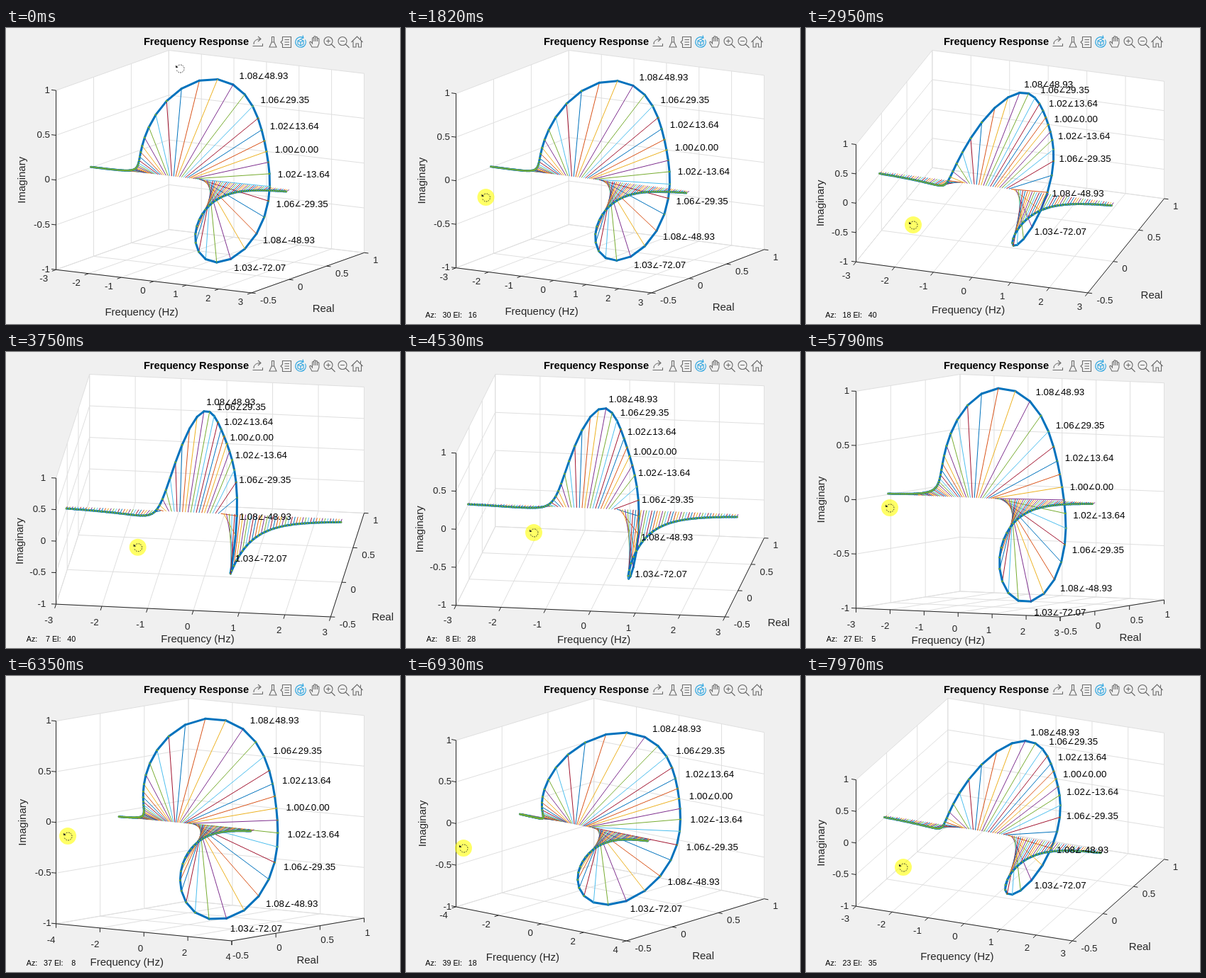
An HTML page with a canvas for the animation above (8 s loop, 555x418 px).

```html
<!DOCTYPE html>
<html lang="en">
<head>
<meta charset="utf-8">
<title>Frequency Response</title>
<style>
html, body { margin: 0; width: 100%; height: 100%; overflow: hidden; background: #f0f0f0; }
canvas { display: block; }
</style>
</head>
<body>
<canvas id="stage" width="555" height="418"></canvas>
<script>
const ctx = document.getElementById('stage').getContext('2d');
const LOOP = 8000, DRAG_START = 1820, STEP = 113.7, LAST_STEP = 54;
const LEFT = 70.5, RIGHT = 504.5, TOP = 31.5, BOTTOM = 374;
const INK = '#262626', GRID = '#dfdfdf';
const SANS = '"Liberation Sans", Arial, sans-serif';
const COLORS = ['#0072bd', '#d95319', '#edb120', '#7e2f8e', '#77ac30', '#4dbeee', '#a2142f'];

// Drag path: step, azimuth, elevation, pointer x, pointer y
const DRAG = [
  [0, 30, 16, 112.5, 239], [5, 25, 29, 128, 261], [10, 18.2, 40.2, 151, 278],
  [15, 10, 41, 176, 279], [20, 4, 36, 195, 268], [24, 8.3, 27.6, 180, 255],
  [31, 18, 9, 146, 226], [35, 27, 5, 118, 220], [40, 37, 8, 87, 226],
  [45, 39, 18, 81, 243], [50, 32, 29, 107, 262], [54, 23, 35, 137, 270]
];
// Pointer before the drag: time, x, y
const APPROACH = [
  [0, 245, 57], [120, 232, 76], [230, 199, 128], [340, 160, 186], [460, 130, 232],
  [580, 120, 249], [800, 115, 242], [920, 110, 236], [1260, 109, 236]
];

// H(s) = 13 / (s^2 + 4s + 13) on the imaginary axis
function response(f) {
  const w = 2 * Math.PI * f, a = 13 - w * w, b = 4 * w, d = a * a + b * b;
  return { f, re: 13 * a / d, im: -13 * b / d };
}
const SAMPLES = Array.from({ length: 101 }, (_, i) => response((i - 50) * 0.06));
const TAGS = [44, 46, 48, 50, 52, 54, 56, 58].map(i => {
  const s = SAMPLES[i];
  const deg = Math.atan2(s.im, s.re) * 180 / Math.PI;
  return { s, mag: Math.hypot(s.re, s.im).toFixed(2), deg: (i === 50 ? 0 : deg).toFixed(2) };
});

// Cubic Hermite through uneven keys
function spline(keys, k) {
  let i = 0;
  while (i < keys.length - 2 && k >= keys[i + 1][0]) i++;
  const a = keys[i], b = keys[i + 1], h = b[0] - a[0], u = (k - a[0]) / h;
  const slope = (n, c) => {
    const p = keys[Math.max(n - 1, 0)], q = keys[Math.min(n + 1, keys.length - 1)];
    return (q[c] - p[c]) / (q[0] - p[0]);
  };
  return a.map((_, c) =>
    (2 * u ** 3 - 3 * u * u + 1) * a[c] + (u ** 3 - 2 * u * u + u) * h * slope(i, c) +
    (3 * u * u - 2 * u ** 3) * b[c] + (u ** 3 - u * u) * h * slope(i + 1, c));
}

function makeView(azDeg, elDeg) {
  const az = azDeg * Math.PI / 180, el = elDeg * Math.PI / 180;
  const ca = Math.cos(az), sa = Math.sin(az), ce = Math.cos(el), se = Math.sin(el);
  const w = (RIGHT - LEFT) / (ca + sa);
  const h = (BOTTOM - TOP) / (ce + se * (ca + sa));
  const limit = azDeg > 34 ? 4 : 3;
  // Unit cube to stage
  const cube = (x, y, z) => ({
    x: LEFT + w * (x * ca + y * sa),
    y: BOTTOM - h * ((1 - x) * sa * se + y * ca * se + z * ce),
    d: x * sa * ce - y * ca * ce + z * se
  });
  return {
    az: azDeg, limit, cube, flat: elDeg < 10,
    tiltX: h * se * sa, tiltY: h * se * ca,
    data: (f, re, im) => cube((f / limit + 1) / 2, (re + 0.5) / 1.5, (im + 1) / 2)
  };
}

function line(points, color, width = 1) {
  ctx.strokeStyle = color;
  ctx.lineWidth = width;
  ctx.beginPath();
  points.forEach(p => ctx.lineTo(p.x, p.y));
  ctx.stroke();
}

function dot(x, y, r, color) {
  ctx.fillStyle = color;
  ctx.beginPath();
  ctx.arc(x, y, r, 0, 2 * Math.PI);
  ctx.fill();
}

function text(str, x, y, size, align = 'center', color = INK, font = SANS) {
  ctx.font = size + 'px ' + font;
  ctx.textAlign = align;
  ctx.textBaseline = 'middle';
  ctx.fillStyle = color;
  ctx.fillText(str, x, y);
}

function direction(a, b) {
  const n = Math.hypot(b.x - a.x, b.y - a.y);
  return { x: (b.x - a.x) / n, y: (b.y - a.y) / n };
}

function middle(a, b) {
  return { x: (a.x + b.x) / 2, y: (a.y + b.y) / 2 };
}

function drawAxes(v) {
  const c = v.cube;
  const wall = corners => {
    ctx.fillStyle = '#fff';
    ctx.beginPath();
    corners.map(p => c(...p)).forEach(p => ctx.lineTo(p.x, p.y));
    ctx.fill();
  };
  wall([[0, 0, 0], [1, 0, 0], [1, 1, 0], [0, 1, 0]]);
  wall([[0, 0, 0], [0, 1, 0], [0, 1, 1], [0, 0, 1]]);
  wall([[0, 1, 0], [1, 1, 0], [1, 1, 1], [0, 1, 1]]);

  const ticks = (from, gap, count) => Array.from({ length: count + 1 }, (_, i) =>
    ({ p: i / count, s: String(from + i * gap) }));
  const gap = v.limit === 4 ? 2 : 1;
  const xs = ticks(-v.limit, gap, 2 * v.limit / gap);
  const ys = ticks(-0.5, 0.5, 3);
  const zs = ticks(-1, 0.5, 4);
  xs.forEach(({ p }) => line([c(p, 0, 0), c(p, 1, 0), c(p, 1, 1)], GRID));
  ys.forEach(({ p }) => line([c(1, p, 0), c(0, p, 0), c(0, p, 1)], GRID));
  zs.forEach(({ p }) => line([c(0, 0, p), c(0, 1, p), c(1, 1, p)], GRID));

  const a = c(0, 0, 0), b = c(1, 0, 0), back = c(1, 1, 0), up = c(0, 0, 1);
  line([up, a, b, back], INK);

  // Seen almost edge-on, the floor ticks hang down
  const down = { x: 0, y: 1 };
  const xDir = direction(a, b);
  const outX = v.flat ? down : direction(back, b);
  const outY = v.flat ? down : xDir;
  const mark = (p, d, len = 6) => line([p, { x: p.x + len * d.x, y: p.y + len * d.y }], INK);
  xs.forEach(({ p, s }) => {
    const q = c(p, 0, 0);
    mark(q, outX);
    text(s, q.x - 1 + 11 * outX.x, q.y + 8.5 + 15 * outX.y, 13.33, 'right');
  });
  ys.forEach(({ p, s }) => {
    const q = c(1, p, 0);
    mark(q, outY);
    text(s, q.x + 1 + 11.5 * outY.x, q.y + 11 + 10 * outY.y * v.flat, 13.33, 'left');
  });
  zs.forEach(({ p, s }) => {
    const q = c(0, 0, p);
    mark(q, xDir, -6.5);
    text(s, 54.5 + 0.25 * v.az, q.y, 13.33, 'right');
  });

  const mx = middle(a, b), my = middle(b, back), mz = middle(a, up);
  text('Frequency (Hz)', mx.x + 13 - v.az, mx.y + 37.5 + 0.21 * v.tiltX, 15);
  text('Real', my.x + 58 - 1.2 * v.az, my.y + 36 + 0.26 * v.tiltY, 15);
  ctx.save();
  ctx.translate(19 + 0.12 * v.az, mz.y);
  ctx.rotate(-Math.PI / 2);
  text('Imaginary', 0, 0, 15);
  ctx.restore();
}

function drawData(v) {
  const tips = SAMPLES.map(s => v.data(s.f, s.re, s.im));
  const items = [];
  tips.forEach((tip, i) => {
    const foot = v.data(SAMPLES[i].f, 0, 0);
    items.push({
      d: (tip.d + foot.d) / 2,
      draw: () => line([foot, tip], COLORS[(i + 1) % 7])
    });
    if (i) {
      const prev = tips[i - 1];
      items.push({ d: (tip.d + prev.d) / 2, draw: () => line([prev, tip], COLORS[0], 3) });
    }
    items.push({ d: tip.d + 0.04, draw: () => dot(tip.x, tip.y, 1.3, COLORS[4]) });
  });
  ctx.lineCap = 'round';
  items.sort((p, q) => p.d - q.d).forEach(item => item.draw());
  ctx.lineCap = 'butt';

  TAGS.forEach(({ s, mag, deg }) => {
    const p = v.data(s.f, 1.1 * s.re, 1.1 * s.im), x = p.x + 1.2, y = p.y + 1.7;
    text(mag, x, y, 13.33, 'left', '#000');
    const end = x + ctx.measureText(mag).width;
    text('∠', end, y + 0.5, 10.5, 'left', '#000', '"DejaVu Sans", sans-serif');
    text(deg, end + 9.5, y, 13.33, 'left', '#000');
  });
}

const GRAY = '#6b6b6b', BLUE = '#2ca5e0';
const LENS = x => `M${x} 18.5a6 6 0 1 0 12 0a6 6 0 1 0-12 0m10.5 4.500l5 5m-12.500-9.500h6`;
const ICONS = [
  // share, brush, data tip
  ['M347.5 25.5h14v-3.500M349 23c0-5 4-7.500 9-7.500M355 12l4 3.500-4 3.500', GRAY],
  ['M374.5 12.500h3v7l3.500 7.500h-10l3.500-7.500zM373.500 20h5', GRAY],
  ['M389.5 12.500h12v15h-12v-5l-2.500-2.500 2.500-2.500zM392.500 16.500h6.500M392.500 20h6.500M392.500 23.500h6.500', GRAY],
  // rotate, hand
  ['M418.500 13.500a7.300 7.300 0 1 0 3 3M418 10.500l1 3.500-3.500 1M415 16l4 2v5l-4 2-4-2v-5zM411 18l4 2 4-2M415 20v5', BLUE],
  ['M431 27l-3-5.500c-1-2 1-3 2.200-1.200l1.300 1.700v-7c0-2 2.300-2 2.300 0v4v-6c0-2 2.400-2 2.400 0v6v-5c0-2 2.400-2 2.400 0v5v-3c0-2 2.300-2 2.300 0v6l-2 5z', GRAY],
  // zoom in, zoom out, home
  [LENS(448) + 'm-3-3v6', GRAY],
  [LENS(468), GRAY],
  ['M486.500 20l8-8 8 8M489 18.500v8.500h4v-5h3.500v5h4v-8.500M499.500 16v-3.500', GRAY]
].map(([d, color]) => ({ path: new Path2D(d), color }));

function drawHeader() {
  ctx.font = 'bold 14.67px ' + SANS;
  ctx.textAlign = 'center';
  ctx.textBaseline = 'alphabetic';
  ctx.fillStyle = '#000';
  ctx.fillText('Frequency Response', 268, 24);
  ctx.lineWidth = 1.1;
  ICONS.forEach(({ path, color }) => {
    ctx.strokeStyle = color;
    ctx.stroke(path);
  });
}

function drawPointer(x, y, pressed) {
  if (pressed) dot(x, y, 12, 'rgba(255,255,0,0.6)');
  ctx.strokeStyle = ctx.fillStyle = '#222';
  ctx.lineWidth = 1;
  ctx.setLineDash([1.5, 1.5]);
  ctx.beginPath();
  ctx.arc(x + 0.5, y + 0.5, 5.5, -2.6, 2.9);
  ctx.stroke();
  ctx.setLineDash([]);
  ctx.beginPath();
  ctx.moveTo(x - 6, y - 4.5);
  ctx.lineTo(x - 6, y - 1);
  ctx.lineTo(x - 2.5, y - 1);
  ctx.fill();
}

function stateAt(t) {
  if (t < DRAG_START) {
    const [, x, y] = APPROACH.filter(p => p[0] <= t).pop();
    return { az: 30, el: 14.5, x, y, pressed: t >= 1260, dragging: false };
  }
  const step = Math.min(LAST_STEP, Math.floor((t - DRAG_START) / STEP + 0.2));
  const [, az, el, x, y] = spline(DRAG, step);
  return { az, el, x, y, pressed: true, dragging: true };
}

function render(t) {
  const s = stateAt(t), view = makeView(s.az, s.el);
  ctx.fillStyle = '#f0f0f0';
  ctx.fillRect(0, 0, 555, 418);
  drawAxes(view);
  drawData(view);
  drawHeader();
  if (s.dragging) {
    const pad = n => String(Math.round(n)).padStart(4);
    text(`Az: ${pad(s.az)} El: ${pad(s.el)}`, 63.5, 406.5, 10.7, 'center', '#000');
  }
  drawPointer(s.x, s.y, s.pressed);
}

const start = performance.now();
function play() {
  render((performance.now() - start) % LOOP);
  requestAnimationFrame(play);
}
play();
</script>
</body>
</html>
```
